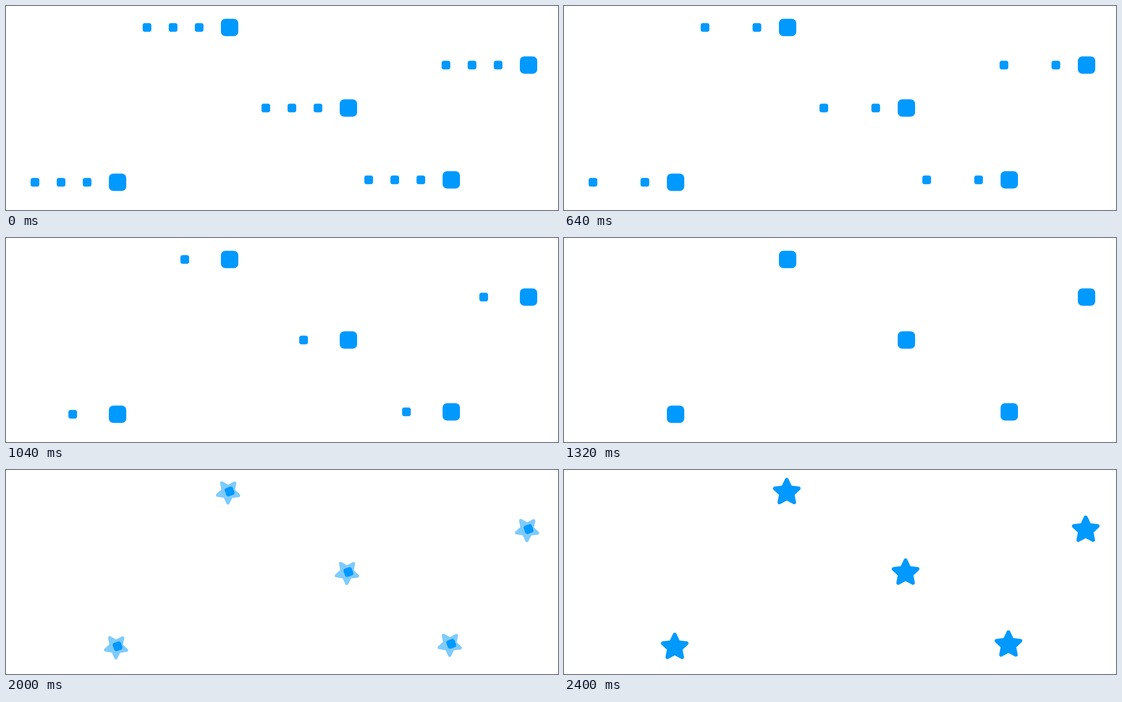
These frames come from a looping animation (1143 by 423 pixels, 3000 ms). An HTML page:

```html
<!DOCTYPE html>
<html lang="en">
<head>
<meta charset="utf-8">
<title>Squares to stars</title>
<style>
  html, body { margin: 0; width: 100%; height: 100%; overflow: hidden; background: #fff; }
  svg { display: block; width: 1143px; height: 423px; fill: #09f; }
  .star { stroke: #09f; stroke-width: 8; stroke-linejoin: round; }
</style>
</head>
<body>
<svg id="stage" viewBox="0 0 1143 423"></svg>
<script>
const LOOP = 3000, STEP = 40;
const SPOTS = [[231, 365.5], [463, 44.5], [1082, 122.5], [709, 211.5], [922, 360.5]];

// Small squares slide one after another into the big one.
const SLIDES = [
  { from: -63, start: 0 },
  { from: -117, start: 400 },
  { from: -171, start: 800 },
];
const SLIDE_TIME = 525;

const MORPH_START = 1775, FADE_TIME = 450;
const SPIN_START = 1760, SPIN_TIME = 640;
const STAR_SCALE = [[1780, 0], [2000, .877], [2085, 1.26], [2120, 1.25], [2200, 1.12], [2320, 1.01], [2400, 1]];

const clamp = v => Math.min(1, Math.max(0, v));
const mix = (a, b, p) => a + (b - a) * p;

function easeInOut(x) {
  let lo = 0, hi = 1;
  for (let i = 0; i < 24; i++) {
    const s = (lo + hi) / 2, r = 1 - s;
    const at = 3 * s * r * r * .42 + 3 * s * s * r * .58 + s * s * s;
    if (at < x) lo = s; else hi = s;
  }
  return lo * lo * (3 - 2 * lo);
}

function track(keys, t) {
  if (t <= keys[0][0]) return keys[0][1];
  for (let i = 1; i < keys.length; i++) {
    const [t0, v0] = keys[i - 1], [t1, v1] = keys[i];
    if (t < t1) return mix(v0, v1, (t - t0) / (t1 - t0));
  }
  return keys[keys.length - 1][1];
}

function starPath(outer, inner) {
  const point = i => {
    const a = i * Math.PI / 5, r = i % 2 ? inner : outer;
    return [r * Math.sin(a), -r * Math.cos(a)];
  };
  const along = (a, b, p) => [mix(a[0], b[0], p), mix(a[1], b[1], p)];
  let d = '';
  for (let i = 0; i < 10; i += 2) {
    const tip = point(i), notch = point(i + 1), next = point(i + 2);
    d += `${i ? 'L' : 'M'}${tip}L${along(notch, tip, .15)}Q${notch} ${along(notch, next, .15)}`;
  }
  return d + 'Z';
}

function add(parent, tag, attrs) {
  const el = document.createElementNS('http://www.w3.org/2000/svg', tag);
  for (const k in attrs) el.setAttribute(k, attrs[k]);
  return parent.appendChild(el);
}

const square = (parent, size) => add(parent, 'rect', {
  x: -size / 2, y: -size / 2, width: size, height: size, rx: size / 4,
});

const stage = document.getElementById('stage');
const outline = starPath(25.8, 12.5);
const groups = SPOTS.map(([x, y]) => {
  const g = add(stage, 'g', { transform: `translate(${x} ${y})` });
  const small = SLIDES.map(() => square(g, 18));
  const big = square(g, 36);
  const star = add(g, 'g', {});
  add(star, 'path', { class: 'star', d: outline, transform: 'translate(0 2.5)' });
  return { small, big, star };
});

const pose = (el, x, y, angle, scale) =>
  el.setAttribute('transform', `translate(${x} ${y}) rotate(${angle}) scale(${scale})`);
const show = (el, on) => el.setAttribute('visibility', on ? 'visible' : 'hidden');

function draw(t) {
  const fade = clamp((t - MORPH_START) / FADE_TIME);
  const spin = easeInOut(clamp((t - SPIN_START) / SPIN_TIME));
  const scale = track(STAR_SCALE, t);
  for (const { small, big, star } of groups) {
    SLIDES.forEach(({ from, start }, i) => {
      const p = clamp((t - start) / SLIDE_TIME);
      pose(small[i], mix(from, 0, p), 0, 0, 1);
      show(small[i], p < 1);
    });
    pose(big, 0, 0, fade ? 240 * spin : 0, 1 - fade);
    show(big, fade < 1);
    pose(star, -1.7, -.8, mix(-97, 360, spin), scale);
    star.setAttribute('opacity', fade);
    show(star, fade > 0 && scale > 0);
  }
}

const begin = performance.now();
function tick() {
  const t = (performance.now() - begin) % LOOP;
  draw(Math.floor(t / STEP) * STEP);
  requestAnimationFrame(tick);
}
tick();
</script>
</body>
</html>
```
